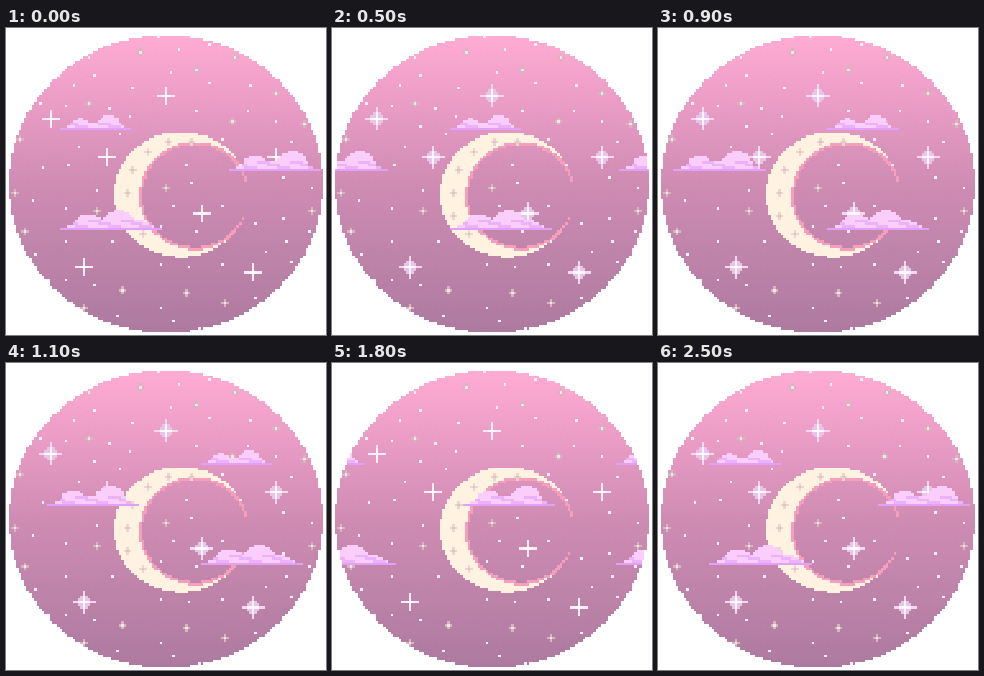
Animation of 320 by 307 pixels, one loop 2600 ms. Source, as an HTML page with a canvas:

```html
<!DOCTYPE html>
<html lang="en">
<head>
<meta charset="utf-8">
<title>Pixel moon</title>
<style>
html, body { margin: 0; width: 100%; height: 100%; overflow: hidden; background: #fff; }
canvas { display: block; width: 320px; height: 307.2px; image-rendering: pixelated; }
</style>
</head>
<body>
<canvas id="sky" width="125" height="120"></canvas>
<script>
const W = 125, H = 120;
const STEP = 100, FRAMES = 26, SPEED = 5, WRAP = 126;
const view = document.getElementById('sky').getContext('2d');
const backdrop = document.createElement('canvas');
backdrop.width = W;
backdrop.height = H;
const still = backdrop.getContext('2d');

const stars = [[17, 35], [62, 26], [39, 50], [105, 50], [76, 72], [30, 93], [96, 95]];

// x: left edge at time zero, base: lowest row, peak: place of the tall bump.
const clouds = [
  { x: 21, base: 39, w: 28, h: 6, peak: .67 },
  { x: 87, base: 55, w: 36, h: 8, peak: .68 },
  { x: 21, base: 78, w: 40, h: 8, peak: .56 }
];

const inEllipse = (x, y, cx, cy, rx, ry) => ((x - cx) / rx) ** 2 + ((y - cy) / ry) ** 2 < 1;
const inSky = (x, y) => inEllipse(x, y, 62, 60.5, 61.3, 58.2);

function dot(g, x, y, color) {
  if (!inSky(x, y)) return;
  g.fillStyle = color;
  g.fillRect(x, y, 1, 1);
}

function disc(g, x, y, r, color) {
  for (let j = -r; j <= r; j++)
    for (let i = -r; i <= r; i++)
      if (Math.abs(i) + Math.abs(j) <= r * 1.5) dot(g, x + i, y + j, color);
}

function cross(g, x, y, reach, color, core) {
  for (let k = -reach; k <= reach; k++) {
    dot(g, x + k, y, color);
    dot(g, x, y + k, color);
  }
  dot(g, x, y, core);
}

function randomizer(seed) {
  return () => {
    seed = (seed * 1664525 + 1013904223) % 4294967296;
    return seed / 4294967296;
  };
}

// Random points in the sky, each at least `gap` cells from all others.
function scatter(count, gap, taken, random) {
  const points = [];
  for (let tries = 0; points.length < count && tries < 4000; tries++) {
    const x = Math.floor(random() * W), y = Math.floor(random() * H);
    const free = [...taken, ...points].every(([a, b]) => Math.hypot(a - x, b - y) >= gap);
    if (free && inSky(x, y)) points.push([x, y]);
  }
  return points;
}

function drawSky(g) {
  const fill = g.createLinearGradient(0, 3, 0, 119);
  fill.addColorStop(0, '#ffacd3');
  fill.addColorStop(.22, '#eb9dc6');
  fill.addColorStop(.5, '#cf8cb3');
  fill.addColorStop(1, '#ad7a9f');
  for (let y = 0; y < H; y++)
    for (let x = 0; x < W; x++) dot(g, x, y, fill);
}

function drawMoon(g) {
  for (let y = 40; y < 91; y++) {
    for (let x = 40; x < 98; x++) {
      if (!inEllipse(x, y, 67.9, 64.6, 26.3, 24.5)) continue;
      const gap = x > 80 && y > 61 && y < 73;
      if (!inEllipse(x, y, 73.2, 65.1, 21.6, 21.1)) dot(g, x, y, '#fff2e0');
      else if (!gap && !inEllipse(x, y, 73.2, 65.1, 20.5, 20)) dot(g, x, y, '#f59fbc');
    }
  }
  for (let i = 0; i < 7; i++) {
    const a = (135 + i * 24.5) * Math.PI / 180;
    const r = 21 + (i % 2);
    cross(g, Math.round(68 + r * Math.cos(a)), Math.round(65 + r * Math.sin(a)), 1, '#ecd6cf', '#e0c4c4');
  }
}

function drawBackdrop(g) {
  const random = randomizer(29);
  const sparks = scatter(20, 14, stars, random);
  const specks = scatter(62, 7, [...stars, ...sparks], random);
  drawSky(g);
  for (const [x, y] of specks) dot(g, x, y, '#fdeef8');
  for (const [x, y] of sparks) cross(g, x, y, 1, '#d5b5c0', '#f3e6df');
  drawMoon(g);
}

function drawStar(g, x, y, bright) {
  if (bright) disc(g, x, y, 2, '#e9c4ea');
  cross(g, x, y, bright ? 4 : 3, bright ? '#f4d8f0' : '#fdebf8', '#fff');
  disc(g, x, y, 1, bright ? '#f3e2fb' : '#f3d4ee');
  cross(g, x, y, bright ? 2 : 1, '#fff6fd', '#fff');
}

const bump = (x, center, radius, height) =>
  height * Math.sqrt(Math.max(0, 1 - ((x - center) / radius) ** 2));

function drawCloud(g, { base, w, h, peak }, left) {
  for (let x = 0; x < w; x++) {
    const foot = 1 + Math.min(x, w - 1 - x, h) * .45;
    const small = bump(x, w * .27, w * .16, h * .85);
    const tall = bump(x, w * peak, w * .19, h + .4);
    const top = Math.max(1, Math.floor(Math.max(foot, small, tall)));
    for (let level = 1; level <= top; level++) {
      const streak = level < h * .6 && Math.sin(x * .5 + level * 1.9) > .35;
      const color = level === 1 ? '#e2a0fb' : streak ? '#ebb2fa' : '#fbcdfa';
      dot(g, left + x, base + 1 - level, color);
    }
  }
}

function render(time) {
  const n = Math.floor(time / STEP) % FRAMES;
  view.clearRect(0, 0, W, H);
  view.drawImage(backdrop, 0, 0);
  for (const [x, y] of stars) drawStar(view, x, y, n % 2 === 1);
  for (const cloud of clouds) {
    const left = (cloud.x + n * SPEED) % WRAP;
    drawCloud(view, cloud, left);
    drawCloud(view, cloud, left - WRAP);
  }
}

drawBackdrop(still);
const start = performance.now();
function tick() {
  render(performance.now() - start);
  requestAnimationFrame(tick);
}
tick();
</script>
</body>
</html>
```
